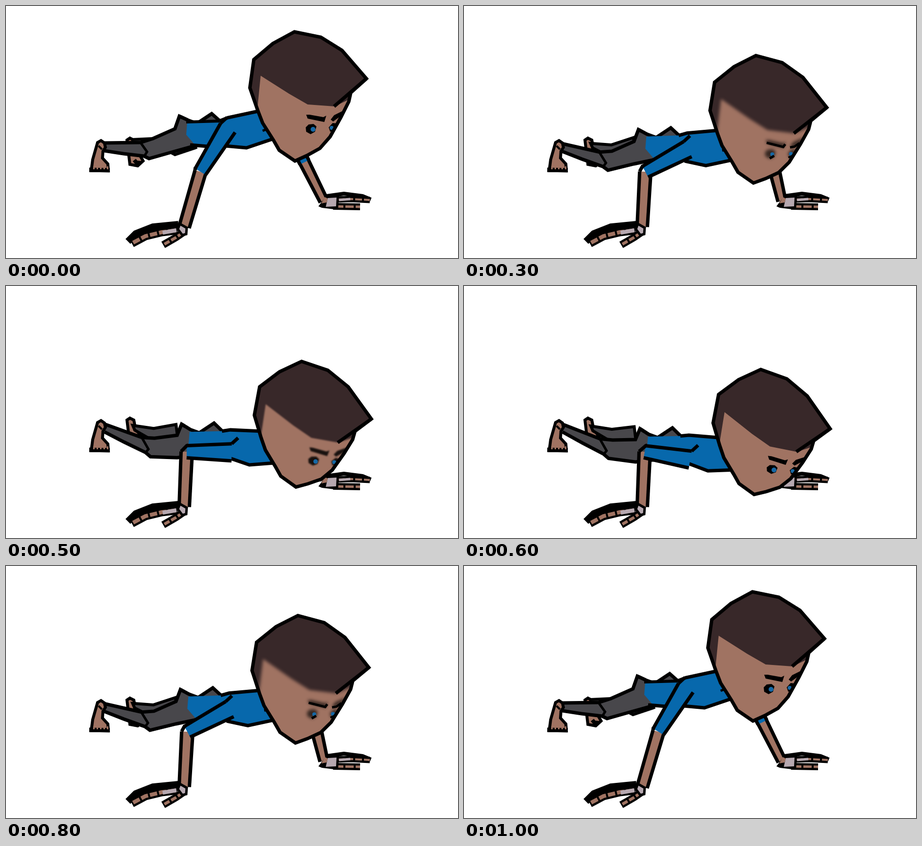
Recreate the animation shown at these times as an HTML page with a canvas. Size 923x517 px, loop 1100 ms.

```html
<!DOCTYPE html>
<html lang="en">
<head>
<meta charset="utf-8">
<title>Push-up</title>
<style>
html, body { margin: 0; width: 100%; height: 100%; overflow: hidden; background: #fff; }
canvas { display: block; }
</style>
</head>
<body>
<canvas id="stage" width="923" height="517"></canvas>
<script>
const ctx = document.getElementById('stage').getContext('2d');
const SKIN = '#a07362', HAIR = '#382829', BLUE = '#0768ac', GREY = '#48474b', PALM = '#b6a8b0', INK = '#000';

// How far the body is lowered at each 100 ms step.
const DEPTH = [0, .015, .059, .412, .639, .86, 1, .8, .412, .12, 0];

// All shapes are given in the raised pose; these rules lower them.
const warp = (pts, move) => pts.flatMap((x, i) => i % 2 ? [] : move(x, pts[i + 1]));

// The body swings about the toes; the knees drop ahead of the hips.
const sag = (pts, p, amount = 1) => warp(pts, (x, y) => {
  const drop = Math.min(.42 * Math.max(0, x - 195), 70) + .3 * Math.max(0, x - 430);
  const d = amount * drop * p ** (x < 330 ? .6 : 1);
  return [x + .08 * d, y + d];
});

// The head sinks, tilts and nods forward.
const nod = (pts, p) => warp(pts, (x, y) => {
  const u = x - 600, v = y - 180;
  return [x + p * (10 - .055 * v), y + p * (126 + .13 * u - .026 * v - .0006 * v * v)];
});

function trace(pts, closed) {
  ctx.beginPath();
  for (let i = 0; i < pts.length; i += 2) ctx.lineTo(pts[i], pts[i + 1]);
  if (closed) ctx.closePath();
}

function fill(pts, color) {
  trace(pts, true);
  ctx.fillStyle = color;
  ctx.fill();
}

function line(pts, width = 7, color = INK, closed = false) {
  trace(pts, closed);
  ctx.lineWidth = width;
  ctx.strokeStyle = color;
  ctx.stroke();
}

function shape(pts, color, width = 6) {
  fill(pts, color);
  line(pts, width, INK, true);
}

function dot([x, y], r, color) {
  ctx.beginPath();
  ctx.arc(x, y, r, 0, 7);
  ctx.fillStyle = color;
  ctx.fill();
}

// A tapering limb with inked sides; returns the two ends of its left side.
function limb([x1, y1], [x2, y2], w1, w2, color) {
  const len = 2 * Math.hypot(x2 - x1, y2 - y1), nx = (y2 - y1) / len, ny = (x1 - x2) / len;
  const left = [x1 - nx * w1, y1 - ny * w1, x2 - nx * w2, y2 - ny * w2];
  const right = [x2 + nx * w2, y2 + ny * w2, x1 + nx * w1, y1 + ny * w1];
  fill([...left, ...right], color);
  line(left);
  line(right);
  return left;
}

// An inked finger whose joints are gaps in a dashed skin line.
function finger(pts, width, joint) {
  line(pts, width);
  ctx.setLineDash([joint, 4]);
  ctx.lineDashOffset = -4;
  line(pts, width - 9, SKIN);
  ctx.setLineDash([]);
}

function farLeg(p) {
  shape([247,275, 253,271, 261,275, 264,290, 280,318, 269,328, 253,325, 250,300], SKIN);
  line([262,316, 266,321, 276,322], 8);
  shape(sag([258,274, 300,272, 345,257, 350,298, 300,298, 262,283], p, .5), GREY);
  shape(sag([328,296, 345,305, 390,290], p, .5), GREY);
}

function farArm(p) {
  const x = 600 + 46 * (1 - (1 - p) ** 2.5), y = 302 + 83 * p;
  const sleeve = .19 * (1 - p) ** 6;
  limb([x, y], [649, 400], 20, 16, SKIN);
  limb([x, y], [x + (649 - x) * sleeve, y + (400 - y) * sleeve], 20, 20, BLUE);
}

function farHand() {
  line([655,390, 690,385, 728,390, 745,397], 8);
  finger([673,397, 705,396, 743,398], 13, 14);
  finger([668,411, 723,412], 14, 17);
  line([680,398, 703,396], 5, PALM);
  fill([638,411, 655,388, 680,390, 678,418, 645,414], INK);
  fill([657,394, 675,393, 674,411, 653,412], PALM);
  fill([644,405, 651,392, 657,395, 655,403], SKIN);
}

function nearLeg(p) {
  const top = sag([199,281, 275,280, 300,272, 345,252, 354,226, 371,234], p);
  const under = sag([388,286, 345,298, 292,313, 282,308, 240,303, 201,297], p);
  fill([...top, ...under], GREY);
  line(top);
  line(under);
  line(sag([276,282, 288,299, 282,309], p), 5);
}

function nearFoot() {
  shape([187,280, 194,276, 201,281, 203,290, 198,298, 197,312, 208,324, 209,338, 174,338, 177,315], SKIN);
  line([170,336, 212,337], 9);
  for (let x = 178; x < 208; x += 7) line([x, 332, x + 3, 332], 6, SKIN);
  line([189,287, 196,294], 4);
}

function torso(p) {
  const hips = sag([354,226, 371,234, 390,241, 420,221, 437,236], p);
  fill([...hips, ...sag([430,260, 380,260], p)], GREY);
  line(hips);
  const back = sag([436,236, 453,229, 514,216], p);
  const belly = sag([550,271, 491,291, 448,287], p);
  fill([...sag([370,239], p), ...back, ...belly, ...sag([385,284, 368,264], p)], BLUE);
  line(back);
  line(belly);
  if (p < .2) {
    line(sag([368,238, 436,236], p), 6);
    line(sag([376,285, 412,288], p));
  }
  if (p < .5) line(sag([524,256, 537,251], p), 5);
}

function nearArm(p) {
  const shoulder = [453 + 9 * p, 250 + 106 * p];
  const elbow = [369 + 28 * (1 - p) ** 6, 340];
  const fore = limb(elbow, [364, 453], 23, 21, SKIN);
  const [sx, sy, ex, ey] = limb(shoulder, elbow, 35, 25, BLUE);
  line([sx, sy, sx + 13, sy - 12]);
  line([fore[0], fore[1], ex, ey, ex + 3, ey - 1]);
}

function nearHand() {
  line([352,448, 300,453, 265,467, 249,483], 14);
  finger([350,460, 318,464, 285,472, 257,487], 17, 15);
  line([348,460, 320,465], 8, PALM);
  finger([364,463, 347,475, 321,490], 15, 12);
  shape([355,447, 369,455, 368,468, 360,470, 351,458], PALM, 5);
}

function face(p, soft, smear) {
  ctx.save();
  ctx.filter = smear;
  ctx.globalAlpha = 1 - .35 * soft;
  const dark = [
    [613,223, 620,223, 648,228, 654,225, 650,238, 616,231],
    [663,233, 670,224, 692,213, 686,224, 668,237],
    [612,249, 618,243, 628,242, 634,247, 631,258, 622,263, 613,258],
    [659,249, 667,240, 676,241, 670,255, 662,258]
  ];
  for (const part of dark) fill(nod(part, p), INK);
  ctx.restore();
  dot(nod([627,253], p), 5 - soft, '#1668a5');
  dot(nod([665,250], p), 4, '#1668a5');
  if (soft > .5) {
    // crisp lower rims stay visible inside the smear
    line(nod([615,229, 649,236, 653,230], p), 5);
    line(nod([663,236, 672,234, 682,226], p), 5);
    line(nod([622,262, 631,256], p), 5);
    line(nod([660,258, 668,254], p), 4);
  }
}

function head(p) {
  const soft = Math.sin(Math.PI * p);
  const smear = soft > .1 ? `blur(${3.2 * soft}px)` : 'none';
  const outline = nod([
    506,110, 545,77, 589,53, 643,64, 686,91, 736,149, 704,178, 700,196, 684,228, 662,268,
    641,292, 614,307, 590,318, 558,296, 546,275, 524,240, 514,214, 498,168
  ], p);
  ctx.save();
  trace(outline, true);
  ctx.clip();
  fill(outline, HAIR);
  ctx.filter = smear;
  // skin reaches past the clip so that only the hairline softens
  fill(nod([520,143, 578,180, 616,202, 671,206, 704,190, 760,220, 700,340, 590,400, 490,300, 513,214], p), SKIN);
  ctx.filter = 'none';
  face(p, soft, smear);
  ctx.restore();
  line(outline, 7, INK, true);
  line(nod([736,149, 670,206], p));
}

function draw(now) {
  const p = DEPTH[Math.floor(now % 1100 / 100)];
  ctx.clearRect(0, 0, 923, 517);
  ctx.miterLimit = 3;
  farLeg(p);
  farArm(p);
  farHand();
  nearLeg(p);
  nearFoot();
  torso(p);
  nearArm(p);
  nearHand();
  head(p);
}

const start = performance.now();
(function tick() {
  draw(performance.now() - start);
  requestAnimationFrame(tick);
})();
</script>
</body>
</html>
```
